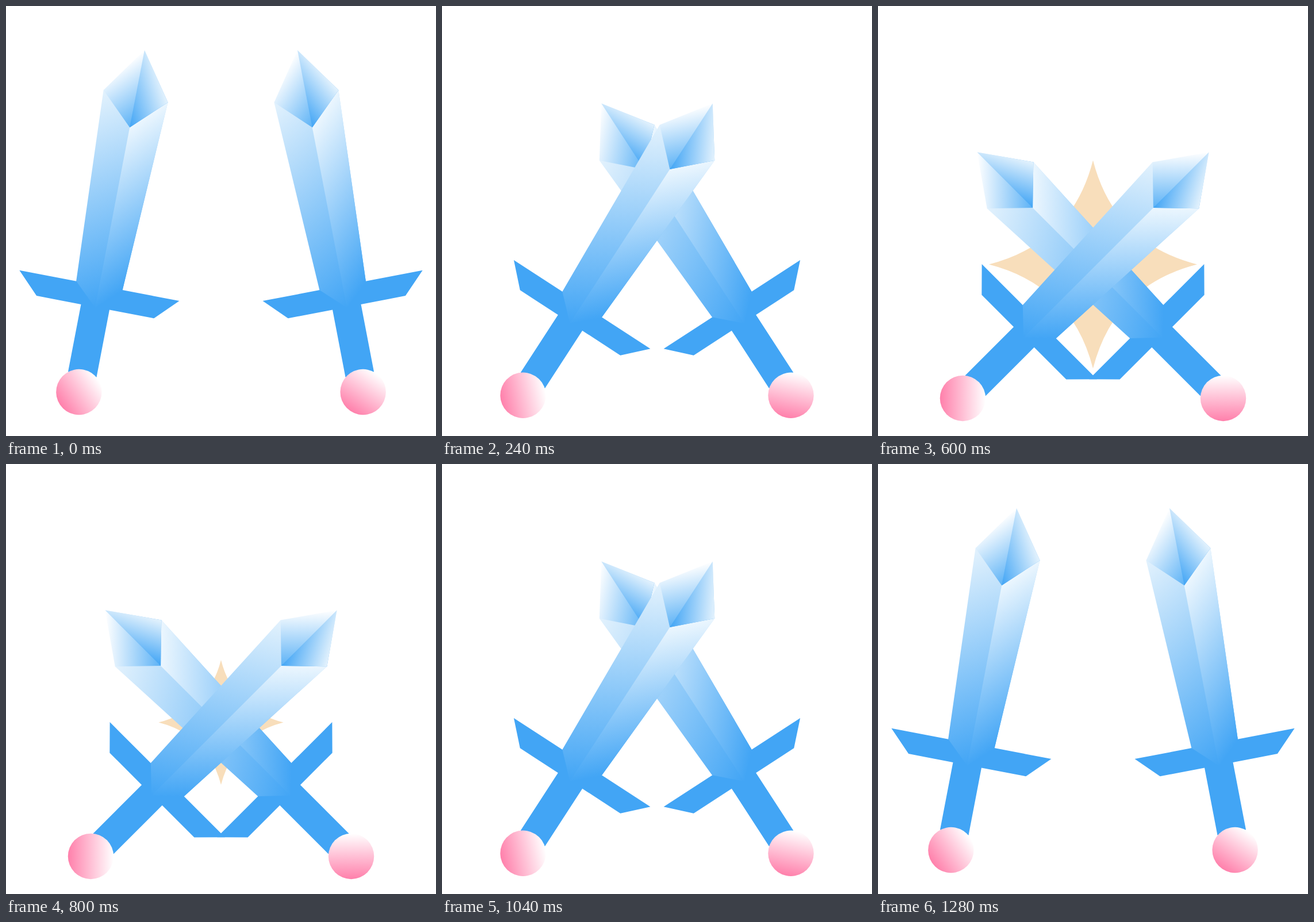
Animation of 748x748 px, one loop 1680 ms. Source, as an HTML page:

```html
<!DOCTYPE html>
<html lang="en">
<head>
<meta charset="utf-8">
<title>Crossing swords</title>
<style>
  html, body { margin: 0; height: 100%; overflow: hidden; background: #fff; }
  svg { display: block; width: 100vw; height: 100vh; }
</style>
</head>
<body>
<svg viewBox="0 0 748 748">
  <defs>
    <g id="gradients">
      <linearGradient id="tipLeft" gradientUnits="userSpaceOnUse" x1="0" y1="-605.5" x2="68.6" y2="-536.9">
        <stop stop-color="#fff"/><stop offset="1" stop-color="#5cb2f6"/>
      </linearGradient>
      <linearGradient id="tipRight" gradientUnits="userSpaceOnUse" x1="0" y1="-468.7" x2="66.8" y2="-504.3">
        <stop stop-color="#42a5f5"/><stop offset="1" stop-color="#e3f2fd"/>
      </linearGradient>
      <linearGradient id="bladeLeft" gradientUnits="userSpaceOnUse" x1="-57" y1="-524" x2="123.7" y2="-224.5">
        <stop stop-color="#e3f2fd"/><stop offset="1" stop-color="#42a5f5"/>
      </linearGradient>
      <linearGradient id="bladeRight" gradientUnits="userSpaceOnUse" x1="57" y1="-524" x2="217" y2="-364">
        <stop stop-color="#ebf6fe"/><stop offset="1" stop-color="#42a5f5"/>
      </linearGradient>
      <linearGradient id="pink" gradientUnits="userSpaceOnUse" x1="-28" y1="28" x2="28" y2="-28">
        <stop stop-color="#ff80ab"/><stop offset="1" stop-color="#fff"/>
      </linearGradient>
    </g>
    <!-- Upright sword; the origin is the bottom of the pommel -->
    <g id="sword" transform="translate(0 -39.7)">
      <path fill="#42a5f5" d="M-141.6-188.5H141.6L104-150.5H25.2V-31H-25.2V-150.5H-104Z"/>
      <path fill="url(#bladeLeft)" d="M-57-524H57L41-188.6 0-149.4-41-188.6Z"/>
      <path fill="url(#bladeRight)" d="M0-524H57L41-188.6 0-149.4Z"/>
      <path fill="url(#tipLeft)" d="M0-605.5 57-524 0-468.7-57-524Z"/>
      <path fill="url(#tipRight)" d="M0-605.5 57-524 0-468.7Z"/>
      <circle r="39.7" fill="url(#pink)"/>
    </g>
  </defs>
  <path id="star" fill="#f8debb" d="M0-181Q37-37 181 0Q37 37 0 181Q-37 37-181 0Q-37-37 0-181Z"/>
  <use id="right" href="#sword"/>
  <use id="left" href="#sword"/>
</svg>
<script>
  const LOOP = 1680;
  // [start ms, sword angle, star scale]
  const poses = [
    [0, 10.86, 0], [120, 20.94, 0], [240, 33, 0], [360, 45, 0], [480, 45, 0.6], [600, 45, 1],
    [800, 45, 0.6], [920, 45, 0], [1040, 33, 0], [1160, 20.94, 0], [1280, 10.86, 0]
  ];
  const place = (id, x, y, rest) =>
    document.getElementById(id).setAttribute("transform", `translate(${x} ${y}) ${rest}`);

  function draw() {
    const time = performance.now() % LOOP;
    const [, angle, scale] = poses.findLast(([start]) => start <= time);
    place("left", 119.4, 710.5, `rotate(${angle})`);
    place("right", 628.6, 710.5, `rotate(${-angle})`);
    place("star", 374, 449.5, `scale(${scale})`);
    requestAnimationFrame(draw);
  }
  draw();
</script>
</body>
</html>
```
